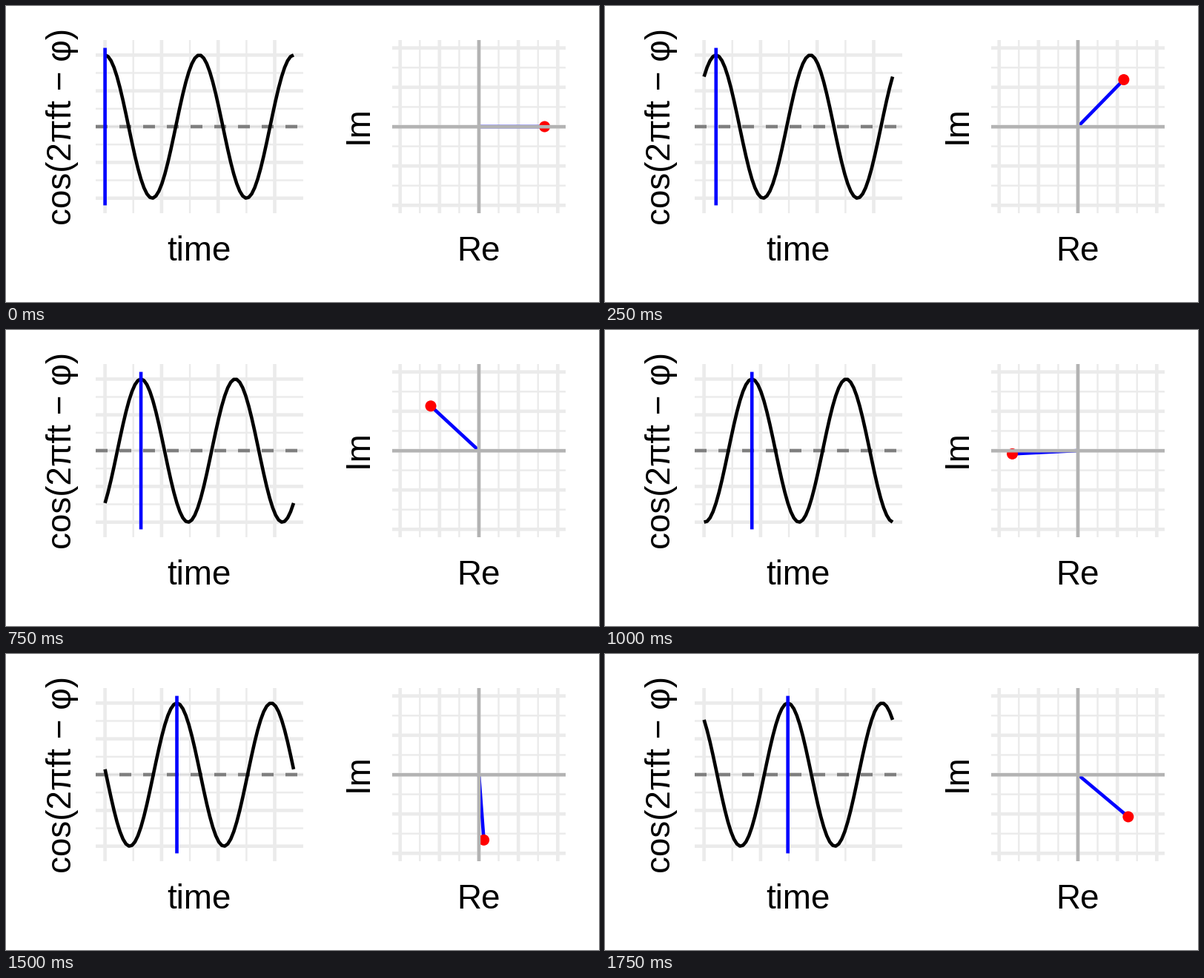
These frames come from a looping animation (800x400 px, 2 s). A matplotlib script:

```python
import numpy as np
import matplotlib.pyplot as plt
from matplotlib.animation import FuncAnimation
from matplotlib.patches import Circle

W, H, DPI = 800, 400, 100
FRAMES, INTERVAL = 8, 250
PX = 72 / DPI  # points per pixel

TOP, BOTTOM, MID = 46, 280, 163
WAVE_L, WAVE_R = 121, 401
RE_L, RE_R, RE_MID = 521, 755, 638
START, PERIOD = 133.6, 127.2
AMP, RADIUS = 96.7, 88.6
STEP = 2 * np.pi * 8 / 63
THICK = 4.6

plt.rcParams["font.family"] = "Liberation Sans"
fig = plt.figure(figsize=(W / DPI, H / DPI), dpi=DPI, facecolor="white")
ax = fig.add_axes([0, 0, 1, 1])
ax.set_xlim(0, W)
ax.set_ylim(H, 0)
ax.axis("off")


def line(xs, ys, color, z, width=THICK, **kw):
    kw.setdefault("solid_capstyle", "butt")
    return ax.plot(xs, ys, color=color, lw=width * PX, zorder=z,
                   snap=False, **kw)[0]


def grid(left, right, xs, ys):
    """Draw a panel grid whose even lines are major and odd ones minor."""
    for i, x in enumerate(xs):
        line([x, x], [TOP, BOTTOM], "#EBEBEB", 1, THICK if i % 2 == 0 else 2.4)
    for i, y in enumerate(ys):
        line([left, right], [y, y], "#EBEBEB", 1, THICK if i % 2 == 0 else 2.4)


def label(x, y, text, rotation=0):
    ax.text(x, y, text, fontsize=45.8 * PX, color="black", ha="center",
            va="baseline", rotation=rotation, rotation_mode="anchor")


# Wave panel
grid(WAVE_L, WAVE_R, START + 38.15 * np.arange(7),
     MID + AMP * np.linspace(-1, 1, 9))
line([WAVE_L, WAVE_R], [MID, MID], "#D2D2D2", 2, 1)
dash = 16 / THICK
line([WAVE_L, WAVE_R], [MID, MID], "#7F7F7F", 3,
     linestyle=(0, (dash, dash)), dash_capstyle="butt")
label(260, 344, "time")
label(88, 162.5, "cos(2πft − φ)", 90)

# Complex plane panel
ticks = 26.58 * np.arange(-4, 5)
grid(RE_L, RE_R, RE_MID + ticks, MID + ticks)
line([RE_L, RE_R], [MID + 0.2] * 2, "#B3B3B3", 8)
line([RE_MID] * 2, [TOP, BOTTOM], "#B3B3B3", 8)
label(637, 344, "Re")
label(488, 161, "Im", 90)

# Moving parts
t = np.linspace(0, 2, 64)
wave = line(START + PERIOD * t, 0 * t, "black", 4, solid_joinstyle="round")
marker = line([START] * 2, [56.6, 269.4], "#0000FF", 5)
arm = line([RE_MID] * 2, [MID] * 2, "#0000FF", 6)
dot = ax.add_patch(Circle((RE_MID, MID), 7.5, fc="#FF0000", ec="none", zorder=7))


def update(i):
    phase = i * STEP
    wave.set_ydata(MID - AMP * np.cos(2 * np.pi * t - phase))
    x = START + PERIOD * phase / (2 * np.pi)
    marker.set_xdata([x, x])
    px = RE_MID + RADIUS * np.cos(phase)
    py = MID - RADIUS * np.sin(phase)
    arm.set_data([RE_MID, px], [MID, py])
    dot.center = (px, py)
    return wave, marker, arm, dot


anim = FuncAnimation(fig, update, frames=FRAMES, interval=INTERVAL,
                     repeat=True, repeat_delay=0)
plt.show()
```
